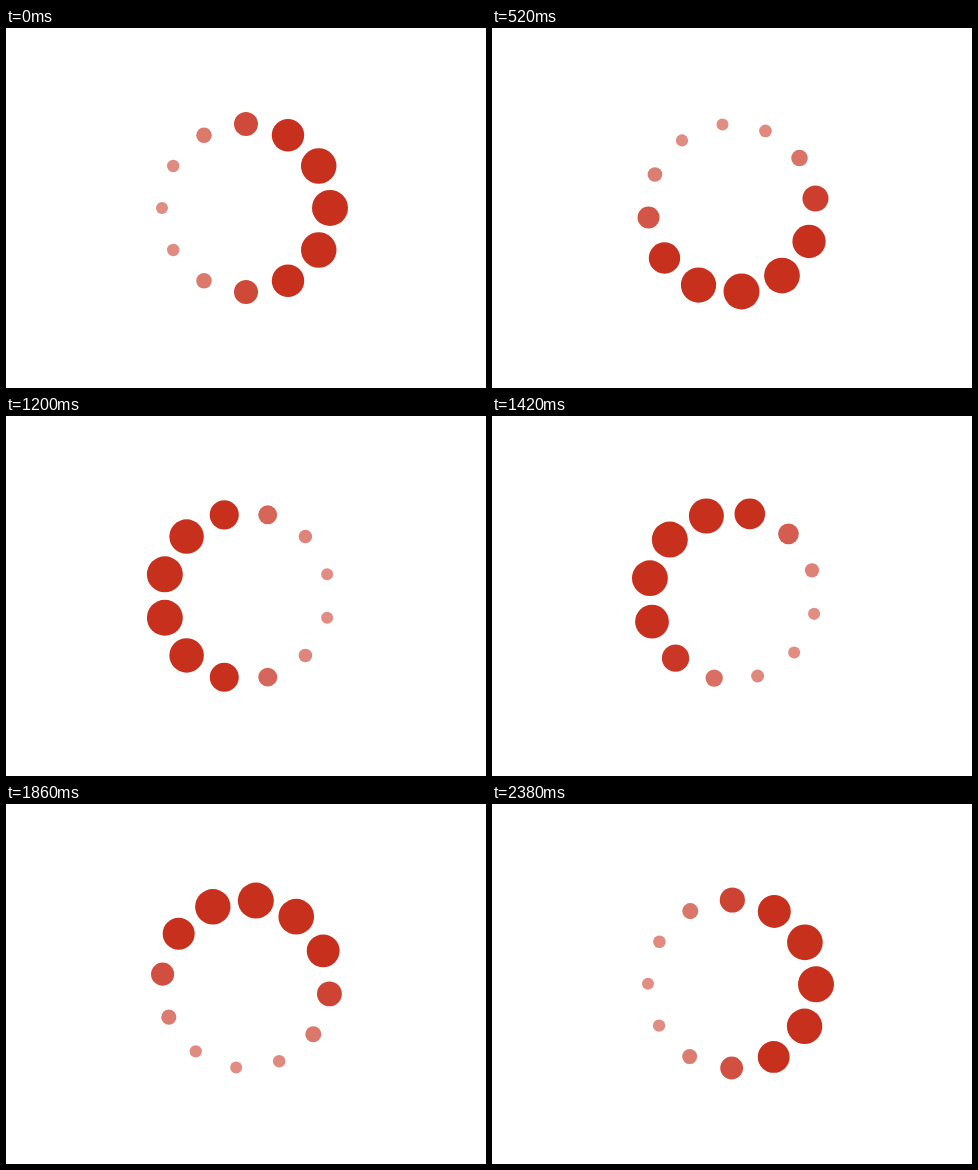
Animation of 480 by 360 pixels, one loop 2.4 s. Source, as an HTML page with a canvas:

```html
<!DOCTYPE html>
<html lang="en">
<head>
<meta charset="utf-8">
<title>Loading ring</title>
<style>
  html, body { margin: 0; width: 100%; height: 100%; overflow: hidden; background: #fff; }
  canvas { display: block; }
</style>
</head>
<body>
<canvas width="480" height="360"></canvas>
<script>
const ctx = document.querySelector('canvas').getContext('2d');
const LOOP = 2400, DOTS = 12, RING = 84, TURN = 2 * Math.PI;

const easeInOutCubic = x => x < 0.5 ? 4 * x ** 3 : 1 - 4 * (1 - x) ** 3;

function draw() {
  const phase = performance.now() % LOOP / LOOP;
  ctx.clearRect(0, 0, 480, 360);
  ctx.fillStyle = '#c8301e';
  for (let i = 0; i < DOTS; i++) {
    // The ring steps back one dot per loop while the swelling runs once around it.
    const turn = (i - phase) / DOTS;
    const offset = turn - phase;
    const distance = Math.abs(offset - Math.round(offset));
    const swell = easeInOutCubic(1 - 2 * distance);
    const angle = turn * TURN;
    ctx.globalAlpha = Math.min(1, 0.55 + 0.65 * swell);
    ctx.beginPath();
    ctx.arc(240 + RING * Math.cos(angle), 180 + RING * Math.sin(angle), 6 + 12 * swell, 0, TURN);
    ctx.fill();
  }
  requestAnimationFrame(draw);
}
draw();
</script>
</body>
</html>
```
